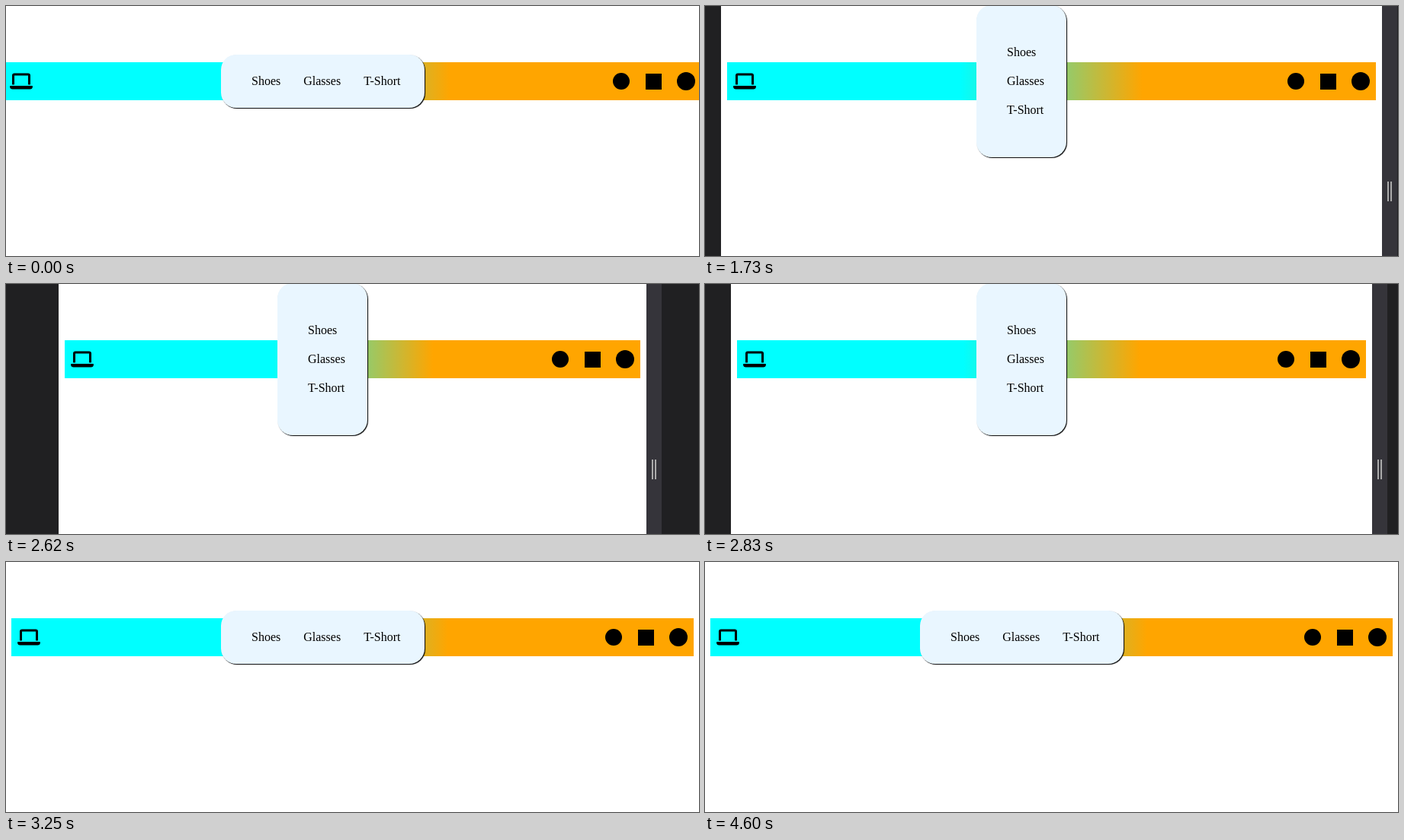
An HTML page for the animation above (5000 ms loop, 909 by 329 pixels).

```html
<!DOCTYPE html>
<html lang="en">
<head>
<meta charset="utf-8">
<style>
  html, body { margin: 0; width: 100%; height: 100%; overflow: hidden; background: #202022; }
  body { position: relative; }
  #page, #bar, #grip, #menu, svg, i { position: absolute; }
  #page { top: 0; bottom: 0; background: #fff; }
  #bar { left: 8px; right: 8px; top: 74px; height: 50px; background: linear-gradient(to right, aqua 36%, orange 64%); }
  #bar svg { left: 8px; top: 13px; }
  #bar i { background: #000; }
  .round { border-radius: 50%; }
  #grip { left: 100%; top: 0; bottom: 0; width: 20px; background: #35343a; }
  #grip i { left: 7px; top: 231px; width: 2px; height: 26px; border: solid #aaa; border-width: 0 2px; }
  #menu {
    box-sizing: border-box; left: 282px; top: 64px; width: 267px; height: 70px; padding-left: 40px;
    display: flex; align-items: center; gap: 30px; white-space: nowrap;
    font: 16px/18px "Liberation Serif", "Times New Roman", serif; color: #000;
    background: #e9f6ff; border-radius: 20px; box-shadow: 1px 1px 1px #000;
  }
  #menu.tall {
    left: 356px; top: -1px; width: 118px; height: 200px;
    flex-direction: column; align-items: flex-start; justify-content: center; gap: 20px;
  }
</style>
</head>
<body>
<div id="page">
  <div id="bar">
    <svg width="30" height="24" viewBox="0 0 30 24">
      <path d="M4.5 16.5V4.5Q4.5 3 6 3H24Q25.5 3 25.5 4.5V16.5" fill="none" stroke="#000" stroke-width="3"/>
      <path d="M1 18H29Q30 18 30 19Q29.7 22.5 26.4 22.5H3.6Q.3 22.5 0 19Q0 18 1 18Z"/>
    </svg>
    <i class="round" style="right:94px;top:14px;width:22px;height:22px"></i>
    <i style="right:52px;top:15px;width:21px;height:21px"></i>
    <i class="round" style="right:8px;top:13px;width:24px;height:24px"></i>
  </div>
  <div id="grip"><i></i></div>
</div>
<div id="menu"><span>Shoes</span><span>Glasses</span><span>T-Short</span></div>
<script>
  const LOOP = 5000, STEP = 70, STAGE = 909, BREAKPOINT = 900;
  // Drag phases: start time, first inset, last inset, number of steps
  const phases = [
    [0, -11, -11, 1],
    [1520, -8, 59, 7],
    [2010, 59, 72, 5],
    [2620, 69, 10, 5],
    [2970, 10, 2, 2],
    [3110, 2, -1, 2],
  ];
  const page = document.getElementById("page");
  const menu = document.getElementById("menu");

  function insetAt(time) {
    const [start, from, to, steps] = phases.filter(p => p[0] <= time).pop();
    const step = Math.min(steps, Math.floor((time - start) / STEP));
    return Math.round(from + (to - from) * step / steps);
  }

  function draw() {
    const inset = insetAt(performance.now() % LOOP);
    const width = STAGE - 2 * inset;
    page.style.left = inset + "px";
    page.style.width = width + "px";
    menu.classList.toggle("tall", width < BREAKPOINT);
    requestAnimationFrame(draw);
  }
  draw();
</script>
</body>
</html>
```
